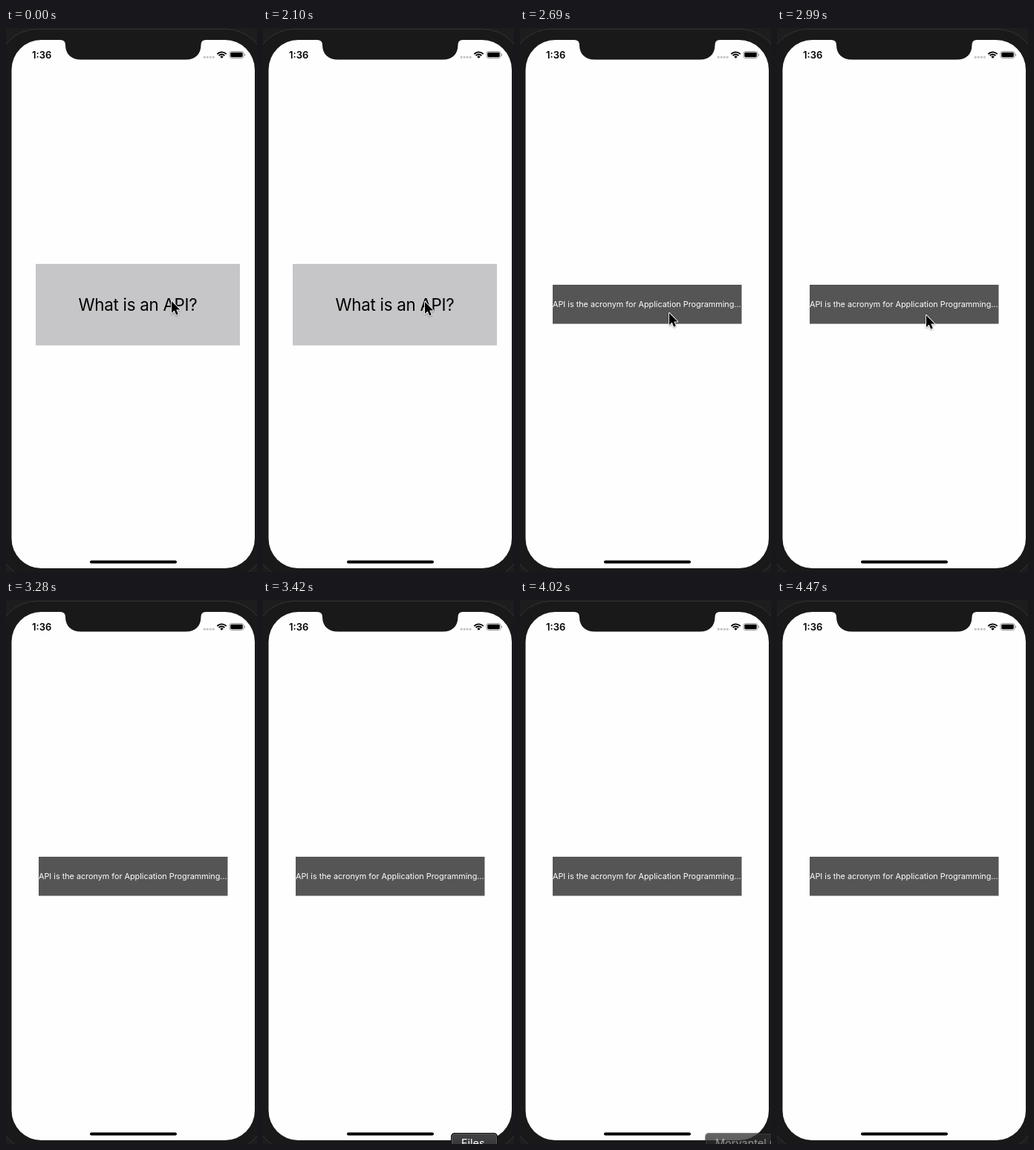
An HTML page with a canvas for the animation above (4.57 s loop, 338 by 731 pixels).

```html
<!DOCTYPE html>
<html lang="en">
<head>
<meta charset="utf-8">
<title>Flip card</title>
<style>
  html, body { margin: 0; width: 100%; height: 100%; overflow: hidden; background: #1b1b1c; }
  canvas { display: block; width: 338px; height: 731px; }
</style>
</head>
<body>
<canvas id="stage"></canvas>
<script>
const W = 338, H = 731, LOOP = 4570;
const FLIP = 2690;
const FONT = 'Inter, "Open Sans", sans-serif';

// Pointer tip: [start time, x, y]; null hides it.
const POINTER = [
  [0, 223, 367], [2100, 218, 368], [2240, 206, 378],
  [2390, 201, 383], [2990, 201, 386], [3130, 244, 613], [3280, null]
];

// Dock labels: [start time, text, left, width, opacity]
const LABELS = [
  [0, ''], [3420, 'Files', 253, 63, 1],
  [3720, 'Morvantel O', 249, 130, 1],
  [4020, 'Morvantel O', 249, 130, 0.5], [4170, '']
];

const canvas = document.getElementById('stage');
const ctx = canvas.getContext('2d');
const dpr = window.devicePixelRatio || 1;
canvas.width = W * dpr;
canvas.height = H * dpr;
ctx.scale(dpr, dpr);

const current = (steps, t) => steps.filter(s => s[0] <= t).pop();

function rect(x, y, w, h, color) {
  ctx.fillStyle = color;
  ctx.fillRect(x, y, w, h);
}

function round(x, y, w, h, r, fill, stroke) {
  ctx.beginPath();
  ctx.roundRect(x, y, w, h, r);
  if (fill) { ctx.fillStyle = fill; ctx.fill(); }
  if (stroke) { ctx.strokeStyle = stroke; ctx.lineWidth = 1; ctx.stroke(); }
}

function text(str, x, y, size, color, { weight = 400, align = 'left', spacing = 0 } = {}) {
  ctx.font = `${weight} ${size}px ${FONT}`;
  ctx.letterSpacing = `${spacing}px`;
  ctx.textAlign = align;
  ctx.fillStyle = color;
  ctx.fillText(str, x, y);
}

function drawPhone() {
  rect(0, 0, W, H, '#1d1d1e');
  round(-12, 1.5, 362, 739, 54, '#191919', '#343435');
  round(7.5, 16, 327.5, 710, 40, '#fefefe');
  // Notch
  ctx.fillStyle = '#191919';
  ctx.fill(new Path2D(
    'M73 15V16Q80 16 80 23C80 35 88 42.5 101 42.5H242' +
    'C255 42.5 262.5 35 262.5 23Q262.5 16 269 16V15Z'));
  round(113, 715.5, 117, 4, 2, '#000');
}

function drawWifi(x, y) {
  ctx.strokeStyle = ctx.fillStyle = '#000';
  ctx.lineWidth = 1.9;
  for (const r of [8.4, 5.3]) {
    ctx.beginPath();
    ctx.arc(x, y, r, -Math.PI * 0.76, -Math.PI * 0.24);
    ctx.stroke();
  }
  ctx.beginPath();
  ctx.moveTo(x, y);
  ctx.arc(x, y, 3, -Math.PI * 0.76, -Math.PI * 0.24);
  ctx.fill();
}

function drawStatus() {
  text('1:36', 35, 41, 13, '#000', { weight: 600 });
  for (let i = 0; i < 4; i++) round(265.7 + i * 4, 37.8, 3, 3, 1, '#c4c4c5');
  drawWifi(290.5, 40.8);
  round(301, 31.5, 19, 9, 2.6, null, '#9b9b9c');
  round(302.3, 32.8, 16.4, 6.4, 1.4, '#000');
  round(320.8, 34.5, 1.3, 3, 0.6, '#9b9b9c');
}

function drawCard(flipped) {
  if (flipped) {
    rect(44, 345, 254.5, 52.5, '#555');
    text('API is the acronym for Application Programming…', 44, 375.2, 10.8, '#fff');
  } else {
    rect(40, 317, 275, 109.5, '#c6c6c8');
    text('What is an API?', 177.5, 380, 22.4, '#000', { align: 'center', spacing: -0.3 });
  }
}

function drawLabel([, str, x, w, alpha]) {
  if (!str) return;
  ctx.globalAlpha = alpha;
  round(x, 716, w, 27, 5, '#0b0b0b');
  const shade = ctx.createLinearGradient(0, 717, 0, 743);
  shade.addColorStop(0, '#434345');
  shade.addColorStop(1, '#303032');
  round(x + 1.5, 717.5, w - 3, 24, 4, shade, '#5c5c5e');
  text(str, x + 14, 735, 14.5, '#fff');
  ctx.globalAlpha = 1;
}

const ARROW = new Path2D('M0 0V16L3.7 12.6L6.2 18.4L8.8 17.3L6.3 11.6H11.3Z');

function drawPointer([, x, y]) {
  if (x === null) return;
  ctx.save();
  ctx.translate(x, y);
  ctx.shadowColor = 'rgba(0,0,0,.35)';
  ctx.shadowBlur = 2 * dpr;
  ctx.shadowOffsetY = dpr;
  ctx.strokeStyle = '#fff';
  ctx.lineWidth = 1.8;
  ctx.lineJoin = 'round';
  ctx.stroke(ARROW);
  ctx.shadowColor = 'transparent';
  ctx.fillStyle = '#000';
  ctx.fill(ARROW);
  ctx.restore();
}

function draw(t) {
  drawPhone();
  drawStatus();
  drawCard(t >= FLIP);
  drawLabel(current(LABELS, t));
  drawPointer(current(POINTER, t));
}

const start = performance.now();
function tick() {
  draw((performance.now() - start) % LOOP);
  requestAnimationFrame(tick);
}
tick();
</script>
</body>
</html>
```
